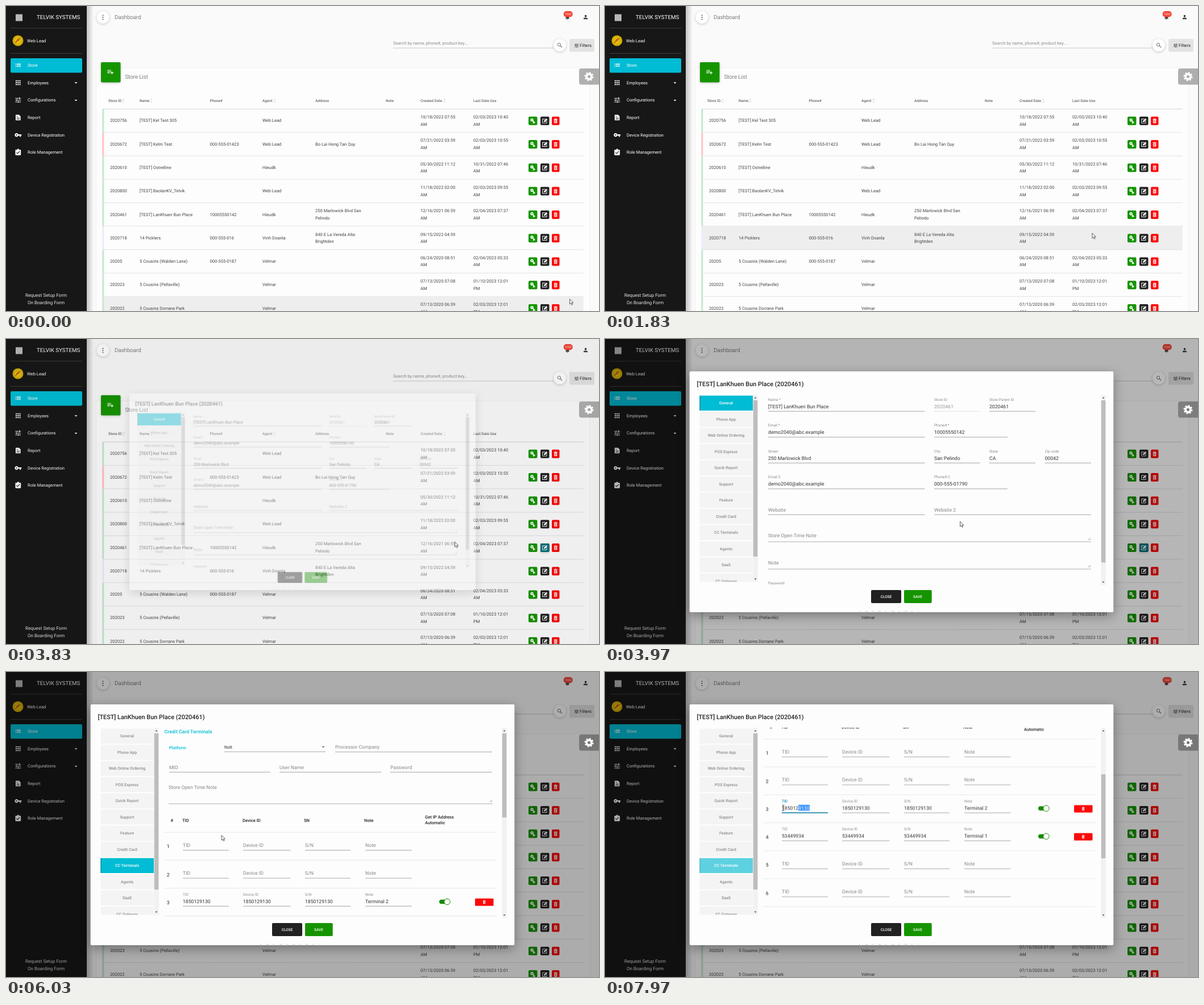
Write an HTML page that moves like this. It is 1043 px wide and 537 px high and loops after 8000 ms.

```html
<!DOCTYPE html>
<html lang="en">
<head>
<meta charset="utf-8">
<title>Store dashboard</title>
<style>
html, body { margin: 0; width: 100%; height: 100%; overflow: hidden; background: #fafafa; }
svg { display: block; width: 1043px; height: 537px; }
text { font-family: Roboto, sans-serif; text-rendering: geometricPrecision; white-space: pre; }
.dialog { transform-origin: 521.5px 269px; }
.soft { filter: drop-shadow(0 1px 2px rgba(0,0,0,.22)); }
.deep { filter: drop-shadow(0 6px 10px rgba(0,0,0,.35)); }
</style>
</head>
<body>
<svg id="stage" viewBox="0 0 1043 537"></svg>
<script>
const LOOP = 8000, CYAN = '#00bcd4', GREEN = '#169400', RED = '#fb0a0a', DARK = '#212121';
let css = '';

// Timeline helpers: frames are [ms, declarations]
function kf(name, frames, ease = 'step-end') {
  const all = [...frames, [LOOP, frames[frames.length - 1][1]]];
  css += `@keyframes ${name}{${all.map(([t, d]) => `${t / LOOP * 100}%{${d}}`).join('')}}
.${name}{animation:${name} ${LOOP}ms ${ease} infinite}`;
}
function show(name, ...toggles) {
  kf(name, [[0, 'opacity:0'], ...toggles.map((t, i) => [t, `opacity:${1 - i % 2}`])]);
}

// Drawing helpers: y is the middle of the capitals
const T = (x, y, s, size = 7.6, fill = '#444', more = '') =>
  `<text x="${x}" y="${y + size * .355}" font-size="${size}" fill="${fill}" ${more}>${s}</text>`;
const R = (x, y, w, h, fill, more = '') =>
  `<rect x="${x}" y="${y}" width="${w}" height="${h}" fill="${fill}" ${more}/>`;
const H = (x1, x2, y, color = '#999', w = .8, more = '') =>
  `<path d="M${x1} ${y}H${x2}" stroke="${color}" stroke-width="${w}" ${more}/>`;
const C = (x, y, r, fill, more = '') => `<circle cx="${x}" cy="${y}" r="${r}" fill="${fill}" ${more}/>`;
const G = (cls, body, more = '') => `<g class="${cls}" ${more}>${body}</g>`;
const BOLD = 'font-weight="500"', MID = 'text-anchor="middle"', LIGHT = 'font-weight="300"';

const icons = {
  list: 'M3 11h2v2H3zM3 15h2v2H3zM3 7h2v2H3zM7 11h14v2H7zM7 15h14v2H7zM7 7h14v2H7z',
  apps: [4, 10, 16].map(x => [4, 10, 16].map(y => `M${x} ${y}h4v4h-4z`).join('')).join(''),
  tune: 'M3 17v2h6v-2zM3 5v2h10V5zM13 21v-2h8v-2h-8v-2h-2v6zM7 9v2H3v2h4v2h2V9zM21 13v-2H11v2zM15 9h2V7h4V5h-4V3h-2z',
  file: 'M4 3h11l5 5v13H4zM7 12v1.6h10V12zM7 16v1.6h10V16zM7 8v1.6h5V8z',
  key: 'M12.65 10A6 6 0 1 0 12.65 14H17v4h4v-4h2v-4zM7 14a2 2 0 1 1 0-4a2 2 0 1 1 0 4z',
  task: 'M5 3h4a3 3 0 0 1 6 0h4a2 2 0 0 1 2 2v14a2 2 0 0 1-2 2H5a2 2 0 0 1-2-2V5a2 2 0 0 1 2-2zM10 17l8-8-1.4-1.4L10 14.2 7.4 11.600 6 13z',
  add: 'M2 10h12v2H2zM2 6h12v2H2zM2 14h8v2H2zM16 10h2v4h4v2h-4v4h-2v-4h-4v-2h4z',
  user: 'M12 12a4 4 0 1 0 0-8a4 4 0 1 0 0 8zM12 14c-2.7 0-8 1.300-8 4v2h16v-2c0-2.700-5.300-4-8-4z',
  bell: 'M10 20h4a2 2 0 0 1-4 0zM18 16v-5c0-3-1.600-5.600-4.500-6.300V4a1.500 1.500 0 0 0-3 0v.7C7.600 5.400 6 8 6 11v5l-2 2v1h16v-1z',
  trash: 'M6 7h12v12a2 2 0 0 1-2 2H8a2 2 0 0 1-2-2zM8.500 9v10h1.200V9zM11.400 9v10h1.200V9zM14.300 9v10h1.200V9zM5 4h3.500l1-1h5l1 1H19v2H5z',
  edit: 'M3 4h12l-2 2H5v13h13v-6l2-2v10H3zM9 12l9-9 4 4-9 9H9z',
  down: 'M6 9h12l-6 6z'
};
const I = (name, x, y, size, fill = '#fff', turn = 0) =>
  `<path d="${icons[name]}" fill="${fill}" fill-rule="evenodd" transform="translate(${x} ${y}) rotate(${turn}) scale(${size / 24}) translate(-12 -12)"/>`;

// Pointer route: ms, x, y
const route = [
  [0, 991.5, 516], [60, 990, 515], [180, 925, 482], [400, 520, 288], [560, 275, 165], [670, 228, 135],
  [850, 222, 125], [1000, 270, 138], [1350, 650, 290], [1600, 850, 380], [1670, 864, 390],
  [1830, 857, 400], [2150, 858, 400], [2500, 900, 365], [2900, 946, 367], [3430, 947, 367],
  [3600, 905, 363], [3830, 790.5, 357.5], [4230, 320, 255], [4500, 222, 208], [4570, 220.5, 207.5],
  [5100, 220.5, 207.5], [5470, 239, 344], [5720, 239, 344], [6030, 379, 287.5], [6270, 400, 270],
  [7060, 400, 270], [7260, 355, 238], [7330, 355, 238], [7630, 383, 238], [7770, 383, 238],
  [7800, 366, 238.5], [7960, 313.5, 239.5]
];
kf('move', route.map(([t, x, y]) => [t, `transform:translate(${x}px,${y}px)`]), 'linear');
function pointer(t) {
  const i = Math.max(1, route.findIndex(p => p[0] >= t));
  const [a, b] = [route[i - 1], route[i]], k = (t - a[0]) / (b[0] - a[0]);
  return [a[1] + (b[1] - a[1]) * k, a[2] + (b[2] - a[2]) * k];
}
const PITCH = 41.27, TOP = 181.3;
const rowAt = ([x, y]) => x > 170 && x < 1015 && y > TOP ? Math.floor((y - TOP) / PITCH) : -1;

function hover(row) {
  const flips = [];
  let on = false;
  for (let t = 0; t < 3810; t += 10) {
    if ((rowAt(pointer(t)) === row) !== on) { on = !on; flips.push(t); }
  }
  if (on) flips.push(3810);
  if (flips[0] === 0) kf('hover' + row, flips.map((t, i) => [t, `opacity:${1 - i % 2}`]));
  else show('hover' + row, ...flips);
}

// Store table
const mint = '#c4e8cf', pink = '#ffc2c8', lilac = '#ececfa';
const stores = [
  ['2020756', '[TEST] Kel Test 305', '', 'Web Lead', '', '10/18/2022 07:55', '02/03/2023 10:40|AM', mint],
  ['2020672', '[TEST] Kelm Test', '000-555-01423', 'Web Lead', 'Bo Lai Hong Tan Quy', '07/21/2022 03:59', '02/03/2023 10:55|AM', pink],
  ['2020610', '[TEST] Ostrelline', '', 'Hieudk', '', '05/30/2022 11:12', '10/31/2022 07:46|AM', mint],
  ['2020800', '[TEST] BaolanKV_Telvik', '', 'Web Lead', '', '11/18/2022 02:00', '02/03/2023 09:55|AM', mint],
  ['2020461', '[TEST] LanKhuen Bun Place', '10005550142', 'Hieudk', '250 Marlowick Blvd San|Pelindo', '12/16/2021 06:59', '02/04/2023 07:37|AM', mint],
  ['2020718', '14 Picklers', '000-555-016', 'Vinh Doanla', '840 E La Vereda Alta|Brightden', '09/15/2022 04:59', '', lilac],
  ['20205', '5 Cousins (Walden Lane)', '000-555-0187', 'Velmar', '', '06/24/2020 08:51', '02/04/2023 05:33|AM', mint],
  ['202023', '5 Cousins (Pellaville)', '', 'Velmar', '', '07/13/2020 07:08', '01/10/2023 12:01|PM', mint],
  ['202022', '5 Cousins Dorrane Park', '', 'Velmar', '', '07/13/2020 06:39', '02/03/2023 12:01|PM', mint]
];
const columns = [183, 235, 358.5, 451, 544, 729, 822];
function cell(x, y, s) {
  const [a, b] = s.split('|');
  return b ? T(x, y - 6.3, a) + T(x, y + 6.3, b) : T(x, y, a);
}
function storeRow(d, i) {
  const y = TOP + PITCH * i, mid = y + 20.5;
  hover(i);
  const values = d.slice(0, 7).map((s, k) => s && cell(columns[k], mid, k === 5 ? s + '|AM' : s)).join('');
  const focus = i === 4 ? R(940, mid - 7, 15.5, 15, '#006f78', 'rx="2" class="press soft"') : '';
  return R(170, y, 845.5, PITCH, '#eeeeee', `class="hover${i}"`) + R(169.3, y + .5, 3, PITCH - .5, d[7]) + values +
    H(170, 1016, y + PITCH, '#dcdce6') +
    R(919, mid - 7, 15.5, 15, GREEN, 'rx="2"') + I('key', 926.7, mid + .5, 11, '#fff', 45) +
    R(940, mid - 7, 15.5, 15, DARK, 'rx="2"') + focus + I('edit', 947.6, mid + .5, 11.5) +
    R(960, mid - 7, 13.5, 15, RED, 'rx="2"') + I('trash', 966.7, mid + .5, 10.5);
}
show('press', 2850, 4000);
const heads = [[180, 'Store ID', 206.5], [235, 'Name', 255.5], [358.5, 'Phone#'], [451, 'Agent', 472.5], [544, 'Address'],
  [668, 'Note'], [729, 'Created Date', 771], [822, 'Last Date Use']];
const sorter = x => `<path d="M${x - 1.6} 165.700l1.600-2 1.600 2M${x - 1.6} 167.700l1.600 2 1.600-2" fill="none" stroke="#aaa" stroke-width=".6"/>`;

const page = R(0, 0, 1043, 537, '#fafafa') +
  R(158.5, 109, 868.5, 440, '#fdfdfd', 'rx="3" stroke="#ececec" stroke-width=".8"') +
  C(170.5, 20, 11, '#fff', 'class="soft"') + [16.5, 20, 23.5].map(y => C(170.5, y, .9, '#444')).join('') +
  T(191, 19.7, 'Dashboard', 9.78, '#3c4048', LIGHT) +
  I('bell', 987.5, 19.5, 10.5, '#3a3a3a') + R(980.7, 9, 16, 10.5, '#f44336', 'rx="5"') + T(988.7, 14.6, '1032', 5.3, '#fff', MID) +
  I('user', 1019.5, 19.5, 11, '#3a3a3a') +
  T(681, 65.3, 'Search by name, phone#, product key...', 7.6, '#8c8c8c') + H(681, 964, 74, '#bbb') +
  C(974, 69, 11, '#fff', 'class="soft"') + C(973, 68, 2.700, 'none', 'stroke="#777" stroke-width="1"') +
  '<path d="M975 70l3 3" stroke="#777" stroke-width="1.200"/>' +
  R(991, 58, 44, 22.5, '#e3e3e3', 'rx="2"') + I('tune', 1003.5, 69.5, 9, '#222') + T(1009, 69.3, 'Filters', 7.6, '#222') +
  R(167, 99, 34.5, 35.5, GREEN, 'rx="2" class="soft"') + I('add', 183.7, 116, 13) +
  T(209.5, 124.5, 'Store List', 9.78, '#3c4048', LIGHT) +
  heads.map(([x, s, a]) => T(x, 166.7, s, 6.52, '#666', BOLD) + (a ? sorter(a) : '')).join('') +
  H(170, 1016, TOP, '#c9c9c9') + stores.map(storeRow).join('');

// Sidebar
const menu = [['list', 'Store'], ['apps', 'Employees', 1], ['tune', 'Configurations', 1], ['file', 'Report'],
  ['key', 'Device Registration'], ['task', 'Role Management']];
const sidebar = R(142, 0, 12, 537, 'url(#edge)') + R(0, 0, 142, 537, '#171717') +
  R(17, 14.5, 12, 12, '#b8b8b8') + T(54, 20, 'TELVIK SYSTEMS', 9.78, '#fff') +
  H(8, 134, 39, '#484840') + H(8, 134, 83.5, '#484840') +
  C(21, 61, 9.5, 'url(#sun)') + '<path d="M15 66l5-8 6-2-3 5z" fill="#c06a10"/>' + T(37, 61, 'Web Lead', 7.6, '#fff') +
  R(8, 92, 126, 25.5, CYAN, 'rx="2"') +
  menu.map(([icon, s, sub], i) => {
    const y = 104.3 + 30.7 * i;
    return I(icon, 21.3, y, 13) + T(38, y, s, 7.6, '#fff') + (sub ? I('down', 123, y + .5, 10) : '');
  }).join('') +
  T(70.5, 508.8, 'Request Setup Form', 8.1, '#e8e8e8', MID) + T(70.5, 522, 'On Boarding Form', 8.1, '#e8e8e8', MID);

const gear = R(1008, 110, 40, 28.5, 'rgba(0,0,0,.3)', 'rx="4"') +
  C(1025.5, 124.3, 4.4, 'none', 'stroke="#fff" stroke-width="3.600"') +
  C(1025.5, 124.3, 6.8, 'none', 'stroke="#fff" stroke-width="2.400" stroke-dasharray="2.940 2.400"');

// Dialog
const field = (x1, x2, y, label, value, off) =>
  (value ? T(x1, y - 12, label, 6.52, '#8a8a8a') + T(x1, y, value, 8.69, off ? '#999' : '#333') : T(x1, y, label, 8.69, '#858585')) +
  H(x1, x2, y + 8.8, off ? '#bbb' : '#8f8f98', .8, off ? 'stroke-dasharray="1 1"' : '');
const grip = (x, y) => `<path d="M${x - 4} ${y}l4-4M${x - 1.6} ${y}l1.600-1.600" stroke="#777" stroke-width=".7"/>`;

const mail = 'demo2040@abc.example';
const general = field(287, 562.5, 118.5, 'Name *', stores[4][1]) + field(579, 659.5, 118.5, 'Store ID', '2020461', 1) +
  field(676, 757, 118.5, 'Store Parent ID', '2020461') +
  field(287, 562.5, 164, 'Email *', mail) + field(579, 708, 164, 'Phone# *', '10005550142') +
  field(287, 562.5, 209.5, 'Street', '250 Marlowick Blvd') + field(579, 659.5, 209.5, 'City', 'San Pelindo') +
  field(676, 757, 209.5, 'State', 'CA') + field(773.5, 855, 209.5, 'Zip code', '00042') +
  field(287, 562.5, 255, 'Email 2', mail) + field(579, 708, 255, 'Phone# 2', '000-555-01790') +
  field(287, 562.5, 300.5, 'Website') + field(579, 855, 300.5, 'Website 2') +
  T(287, 346, 'Store Open Time Note', 8.69, '#858585') + H(287, 855, 357) + grip(854, 354) +
  T(287, 394, 'Note', 8.69, '#858585') + H(287, 855, 405) + grip(854, 402) +
  T(287, 430, 'Password', 6.52, '#8a8a8a');

const slots = [[311, 392, 'TID'], [417, 500.5, 'Device ID'], [526, 606, 'S/N'], [632, 713.5, 'Note']];
const filled = { 2: ['1850129130', 'Terminal 2'], 3: ['53449934', 'Terminal 1'] };
function terminal(i) {
  const y = 305 + 49.25 * i, data = filled[i];
  const extra = data ? R(762, y - 2.8, 15, 7.5, '#168a00', 'rx="3.700"') +
    C(776, y + 1, 5.2, '#fff', 'stroke="#168a00" stroke-width="1"') +
    R(825, y - 4.7, 32.5, 13, RED, 'rx="1.500"') + I('trash', 841.2, y + 1.7, 8) : '';
  return T(285.2, y + 2.2, i + 1, 8.69, '#222', MID) +
    slots.map(([a, b, s], k) => field(a, b, y, s, data && data[k === 3 ? 1 : 0])).join('') +
    extra + H(278, 863, y + 26.3, '#e3e3e8');
}
// Focused field and its growing selection
const SCROLL = 164.4, ty = 305 + 98.5, digit = 8.69 * .5615;
show('focus', 7790);
const picked = [...'0319'].map((c, i) => {
  show('pick' + i, 7850 + 35 * i);
  const x = 311 + digit * (9 - i);
  return G('pick' + i, R(x, ty - 5.2, digit + .4, 10.2, '#3390ff') + T(x, ty, c, 8.69, '#fff'));
}).join('');
const focus = G('focus', R(310, ty - 16, 20, 8, '#fdfdfd') + T(311, ty - 12, 'TID', 6.52, '#0a88b0', BOLD) +
  H(311, 392, ty + 8.8, '#0a88b0', 1.5)) + picked;

const bold = (x, y, s) => T(x, y, s, 7.6, '#222', BOLD);
const terminals = T(278.5, 105, 'Credit Card Terminals', 8.69, CYAN, BOLD) + T(287, 133, 'Platform', 7.6, CYAN, BOLD) +
  T(384, 132.3, 'Nolt', 7.6, '#333') + I('down', 558, 132, 10, '#666') + H(384, 562.5, 140.5) +
  field(579, 855, 132, 'Processor Company') + field(287, 465, 167.5, 'MID') + field(481, 660, 167.5, 'User Name') +
  field(676, 855, 167.5, 'Password') + T(286, 203, 'Store Open Time Note', 8.69, '#858585') + H(286, 856, 232) + grip(855, 229) +
  bold(289.5, 261, '#') + bold(310, 261, 'TID') + bold(416, 261, 'Device ID') + bold(524, 261, 'SN') + bold(630, 261, 'Note') +
  bold(737, 255, 'Get IP Address') + bold(737, 265.5, 'Automatic') + H(278, 863, 282.3, '#e3e3e8') +
  [0, 1, 2, 3, 4, 5, 6].map(terminal).join('') + focus;

const SWITCH = 5740;
kf('first', [[0, 'opacity:1'], [SWITCH, 'opacity:0']]);
show('second', SWITCH);
const wheel = step => [[0, 0], [6490, 0], [6660, 1], [6700, 1], [6870, 2], [6900, 2], [7060, 3]]
  .map(([t, n]) => [t, `transform:translateY(${step * n / 3}px)`]);
kf('scroll', wheel(-SCROLL), 'ease-out');
kf('thumb', wheel(72), 'ease-out');
kf('blur', [[0, 'opacity:1'], [7790, 'opacity:1'], [7960, 'opacity:.62']], 'linear');

const tabs = ['General', 'Phone App', 'Web Online Ordering', 'POS Express', 'Quick Report', 'Support', 'Feature', 'Credit Card',
  'CC Terminals', 'Agents', 'SaaS', 'CC Gateway'];
const tabY = i => 99.7 + 28.5 * i;
const tabText = (i, fill) => T(213, tabY(i) + 13, tabs[i], 7.06, fill, BOLD + MID.padStart(MID.length + 1));
const active = i => G('blur', R(166.5, tabY(i), 93.5, 26.3, CYAN) + R(166.5, tabY(i), 1.4, 26.3, '#008ba0')) + tabText(i, '#fff');
const bar = (x, y1, y2) => R(x, y1, 8.5, y2 - y1, '#f1f1f1') +
  `<path d="M${x + 2.2} ${y1 + 6}h4l-2-2.400zM${x + 2.2} ${y2 - 6}h4l-2 2.400z" fill="#555"/>`;
const thumb = (x, y, h, more) => R(x + .5, y, 7.5, h, '#bdbdbd', more);

const dialog = R(148.7, 57, 745.6, 424, '#fdfdfd', 'rx="2" class="deep"') +
  T(161.5, 79, stores[4][1] + ' (2020461)', 10.86, '#222', BOLD) +
  G('', tabs.map((s, i) => R(166.5, tabY(i), 93.5, 26.3, '#f4f4f4') + tabText(i, '#8c8c8c')).join('') +
    G('first', R(166.5, tabY(0), 93.5, 26.3, '#f4f4f4') + active(0)) +
    G('second', R(166.5, tabY(8), 93.5, 26.3, '#f4f4f4') + active(8)), 'clip-path="url(#tabs)"') +
  bar(260.3, 98.5, 427.5) + thumb(260.3, 108, 275) +
  G('', G('first', general) + G('second', G('scroll', terminals)), 'clip-path="url(#body)"') +
  bar(872.3, 98.5, 433) + thumb(872.3, 108, 285.5, 'class="first"') +
  G('second', thumb(872.3, 108, 148, 'class="thumb"')) +
  R(468, 442, 53, 23, DARK, 'rx="2"') + T(494.5, 453.3, 'CLOSE', 6.52, '#fff', BOLD + ' ' + MID) +
  R(526, 442, 48.7, 23, GREEN, 'rx="2"') + T(550, 453.3, 'SAVE', 6.52, '#fff', BOLD + ' ' + MID) +
  H(447, 551, 479.6, '#aaa', .8, 'stroke-dasharray="2 9 4 8"');

const OPEN = 3810;
const curve = c => `;animation-timing-function:cubic-bezier(${c})`;
kf('dialog', [[0, 'opacity:0;transform:scale(.7)'], [OPEN, 'opacity:0;transform:scale(.7)' + curve('0,0,.2,1')],
  [OPEN + 150, 'opacity:1;transform:scale(1)']], 'linear');
kf('shade', [[0, 'opacity:0'], [OPEN, 'opacity:0' + curve('.25,.8,.25,1')], [OPEN + 400, 'opacity:.32']], 'linear');

// Pointer shapes
kf('arrow', [[0, 'opacity:1'], [2850, 'opacity:0'], [3470, 'opacity:1'], [4370, 'opacity:0'], [5770, 'opacity:1'], [7190, 'opacity:0']]);
show('hand', 2850, 3470, 4370, 5770);
show('beam', 7190);
const cursor = G('move',
  G('arrow', '<path d="M0 0V16.500L4 13L6.700 19L9.400 17.800L6.700 12H12Z" fill="#fff" stroke="#111" stroke-width="1.300" transform="scale(.53)"/>') +
  G('hand', '<path d="M-2 1.500a2 2 0 0 1 4 0V8l7 1.800q2 .6 2 3v4l-2 6H-1.500L-7 15q-1-2 1-2.500l4 2.500zM2 8v5M5.500 9v4M9 10v3" fill="#fff" stroke="#111" stroke-width="1.400" transform="scale(.53)"/>') +
  G('beam', '<path d="M-2-5h1.500L0-4.500.5-5H2M0-4.500v8.500M-2 4.500h1.500L0 4 .5 4.500H2" fill="none" stroke="#222" stroke-width=".9"/>'));

const defs = `<defs>
<linearGradient id="edge"><stop stop-opacity=".22"/><stop offset="1" stop-opacity="0"/></linearGradient>
<radialGradient id="sun"><stop stop-color="#f4d020"/><stop offset="1" stop-color="#c9a400"/></radialGradient>
<clipPath id="tabs">${R(166, 98.5, 95, 329, '#000')}</clipPath>
<clipPath id="body">${R(276, 98.5, 596, 334, '#000')}</clipPath></defs>`;

const style = document.createElement('style');
style.textContent = css;
document.head.append(style);
document.getElementById('stage').innerHTML = defs + page + sidebar +
  R(0, 0, 1043, 537, '#000', 'class="shade"') + gear + G('dialog', dialog) + cursor;
</script>
</body>
</html>
```
